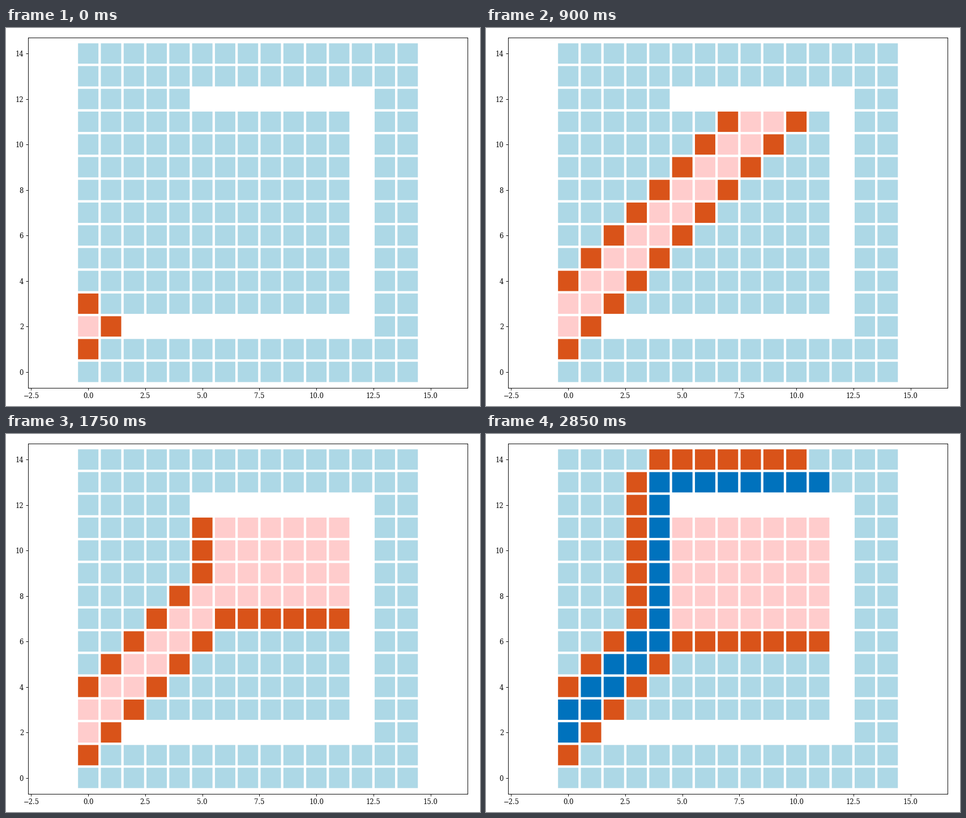
Animation of 837 by 669 pixels, one loop 3.85 s. Source, as a matplotlib script:

```python
import numpy as np
import matplotlib.pyplot as plt
from matplotlib.animation import FuncAnimation
from matplotlib.collections import PolyCollection

W, H, DPI = 837, 669, 72          # at 72 dpi one point is one pixel
N = 15
START, GOAL = (0, 2), (11, 13)
FREE, OPEN, CLOSED, PATH = "#add8e6", "#d95319", "#ffcccc", "#0072bd"
STEP_MS, LOOP_MS = 50, 3850

WALLS = ({(x, 2) for x in range(2, 13)}
         | {(12, y) for y in range(2, 13)}
         | {(x, 12) for x in range(5, 13)})
CELLS = [(x, y) for x in range(N) for y in range(N) if (x, y) not in WALLS]


def rank(cell):
    """Chebyshev distance to the goal, ties broken by coordinates."""
    return max(abs(cell[0] - GOAL[0]), abs(cell[1] - GOAL[1])), cell


def neighbours(cell):
    x, y = cell
    around = [(x, y + 1), (x + 1, y), (x, y - 1), (x - 1, y)]
    return [c for c in around if c in CELL_SET]


def search():
    """Best-first search; returns the cell colours after every expansion."""
    cost, parent = {START: 0}, {START: None}
    frontier, closed, states = {START}, set(), []
    while True:
        cell = min(frontier, key=rank)
        if cell == GOAL:
            break
        frontier.remove(cell)
        closed.add(cell)
        for near in neighbours(cell):
            if near in closed:
                continue
            frontier.add(near)
            if cost[cell] + 1 < cost.get(near, np.inf):
                cost[near] = cost[cell] + 1
                parent[near] = cell
        states.append(colours(frontier, closed))
    path = set()
    while cell:
        path.add(cell)
        cell = parent[cell]
    states.append(colours(frontier, closed, path))
    return states


def colours(frontier, closed, path=()):
    return [PATH if c in path else OPEN if c in frontier
            else CLOSED if c in closed else FREE for c in CELLS]


CELL_SET = set(CELLS)
STATES = search()

plt.rcParams["font.family"] = "DejaVu Serif"
fig = plt.figure(figsize=(W / DPI, H / DPI), dpi=DPI, facecolor="white")

# Axes box and grid pitch in pixels, measured from the top left.
LEFT, RIGHT, TOP, BOTTOM = 39.2, 815.2, 17.3, 636.7
X0, Y0, PX, PY, SIDE = 145.2, 608.65, 40.29, 40.25, 36

ax = fig.add_axes([LEFT / W, 1 - BOTTOM / H, (RIGHT - LEFT) / W, (BOTTOM - TOP) / H])
ax.set_xlim((LEFT - X0) / PX, (RIGHT - X0) / PX)
ax.set_ylim((Y0 - BOTTOM) / PY, (Y0 - TOP) / PY)
ax.set_xticks(np.arange(-2.5, 15.1, 2.5))
ax.set_yticks(range(0, 15, 2))
ax.tick_params(labelsize=11.63, length=4.07, width=0.93, pad=4.07)
for spine in ax.spines.values():
    spine.set_linewidth(0.93)

dx, dy = SIDE / 2 / PX, SIDE / 2 / PY
corners = np.array([(-dx, -dy), (dx, -dy), (dx, dy), (-dx, dy)])
tiles = PolyCollection([corners + c for c in CELLS], facecolors=STATES[0],
                       edgecolors="none", linewidths=0)
tiles.set_snap(False)
ax.add_collection(tiles, autolim=False)


def draw(i):
    tiles.set_facecolor(STATES[min(i, len(STATES) - 1)])
    return [tiles]


anim = FuncAnimation(fig, draw, frames=LOOP_MS // STEP_MS, interval=STEP_MS,
                     init_func=lambda: draw(0), repeat=True, repeat_delay=0)
plt.show()
```
